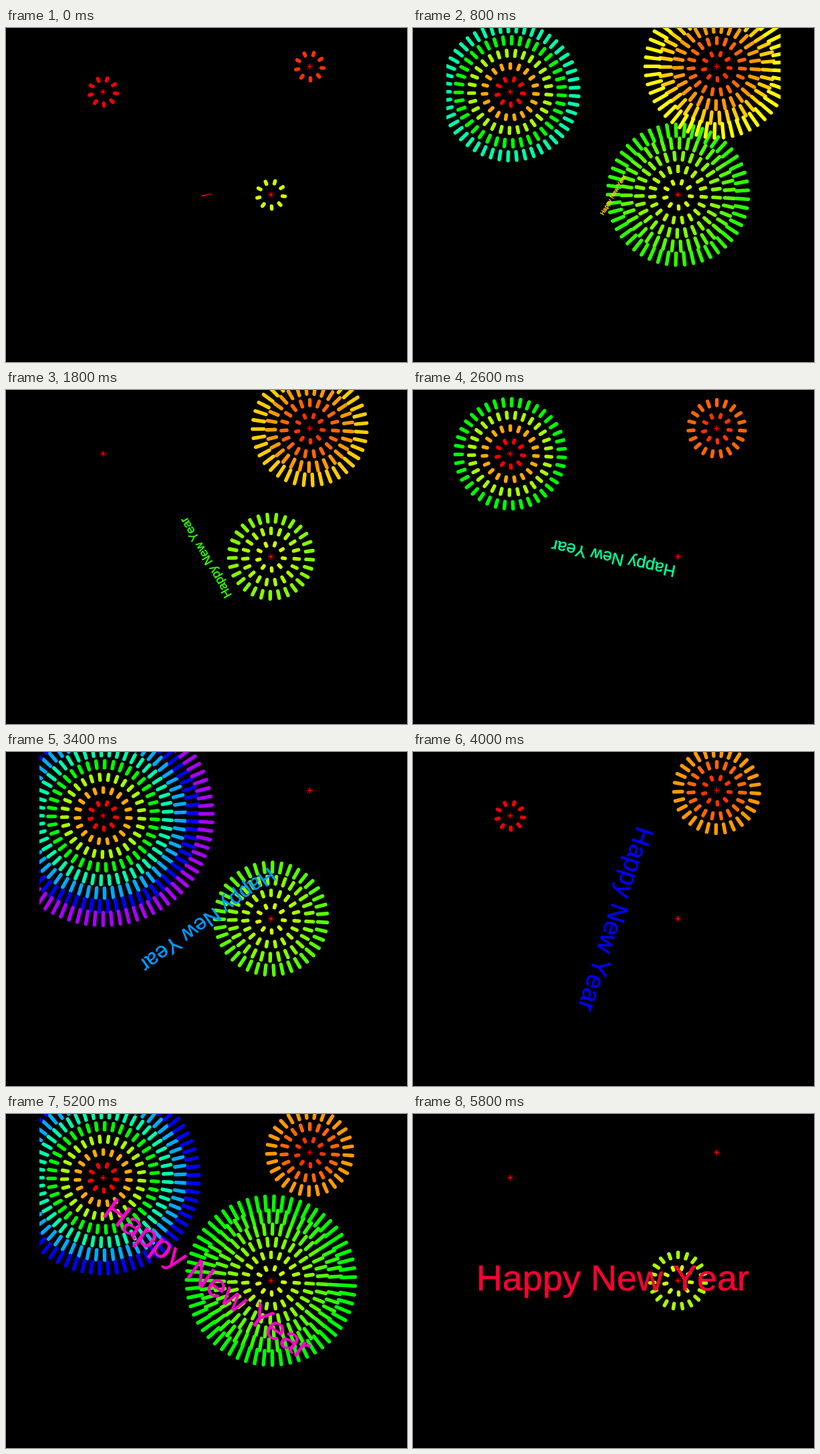
An HTML page with a canvas for the animation above (6 s loop, 600 px wide and 500 px high).

```html
<!DOCTYPE html>
<html>
<head>
<meta charset="utf-8">
<title>Happy New Year</title>
<style>
html, body { margin: 0; height: 100%; overflow: hidden; background: #000; }
canvas { display: block; }
</style>
</head>
<body>
<canvas id="stage" width="600" height="500"></canvas>
<script>
const ctx = document.getElementById('stage').getContext('2d');
const STEPS = 30, STEP_MS = 200, RING_GAP = 19.3, PHASE = 33 * Math.PI / 180;

const fireworks = [
  { x: 145.5, y: 95.5, rings: 9, hue: i => 40 * (i - 1) },
  { x: 396.5, y: 249.5, rings: 6, hue: i => 60 + 10 * i },
  { x: 454.5, y: 57.5, rings: 5, hue: i => 12 * i }
];

const color = hue => `hsl(${hue}, 100%, 50%)`;

// Line through (x, y) along an angle, between two distances from that point
function ray(x, y, angle, from, to) {
  const c = Math.cos(angle), s = Math.sin(angle);
  ctx.moveTo(x + from * c, y - from * s);
  ctx.lineTo(x + to * c, y - to * s);
}

function drawStar({ x, y }) {
  ctx.strokeStyle = '#f00';
  ctx.lineWidth = 1;
  ctx.lineCap = 'butt';
  ctx.beginPath();
  for (let k = 0; k < 4; k++) ray(x, y, k * Math.PI / 4, -4.5, 4.5);
  ctx.stroke();
}

function drawFirework(fw, step) {
  const shown = (step + 1) % (fw.rings + 1);
  ctx.lineWidth = 5.4;
  ctx.lineCap = 'round';
  for (let i = 1; i <= shown; i++) {
    const spokes = 10 * i - 1, r = RING_GAP * i;
    const half = 2 + 8.5 * (i - 1) / (fw.rings - 1);
    ctx.strokeStyle = color(fw.hue(i));
    ctx.beginPath();
    for (let k = 0; k < spokes; k++) {
      ray(fw.x, fw.y, PHASE + 2 * Math.PI * k / spokes, r - half, r + half);
    }
    ctx.stroke();
  }
  drawStar(fw);
}

function drawGreeting(step) {
  const text = 'Happy New Year', size = Math.round(1.8 * (step + 1));
  const x = -0.02 * size, y = 0.26 * size;
  ctx.save();
  ctx.translate(300, 250);
  ctx.rotate(-2 * Math.PI * (step + 1) / STEPS);
  ctx.font = `${size}px "Liberation Sans", Arial, sans-serif`;
  ctx.fontKerning = 'none';
  ctx.textAlign = 'center';
  ctx.fillStyle = ctx.strokeStyle = color(12 * step);
  ctx.lineWidth = 0.5;
  ctx.fillText(text, x, y);
  ctx.strokeText(text, x, y);
  ctx.restore();
}

function draw(step) {
  ctx.fillStyle = '#000';
  ctx.fillRect(0, 0, 600, 500);
  ctx.save();
  ctx.beginPath();
  ctx.rect(50, 0, 500, 450);
  ctx.clip();
  fireworks.forEach(fw => drawFirework(fw, step));
  drawGreeting(step);
  ctx.restore();
}

const start = performance.now();
function tick() {
  draw(Math.floor((performance.now() - start) / STEP_MS) % STEPS);
  requestAnimationFrame(tick);
}
tick();
</script>
</body>
</html>
```
